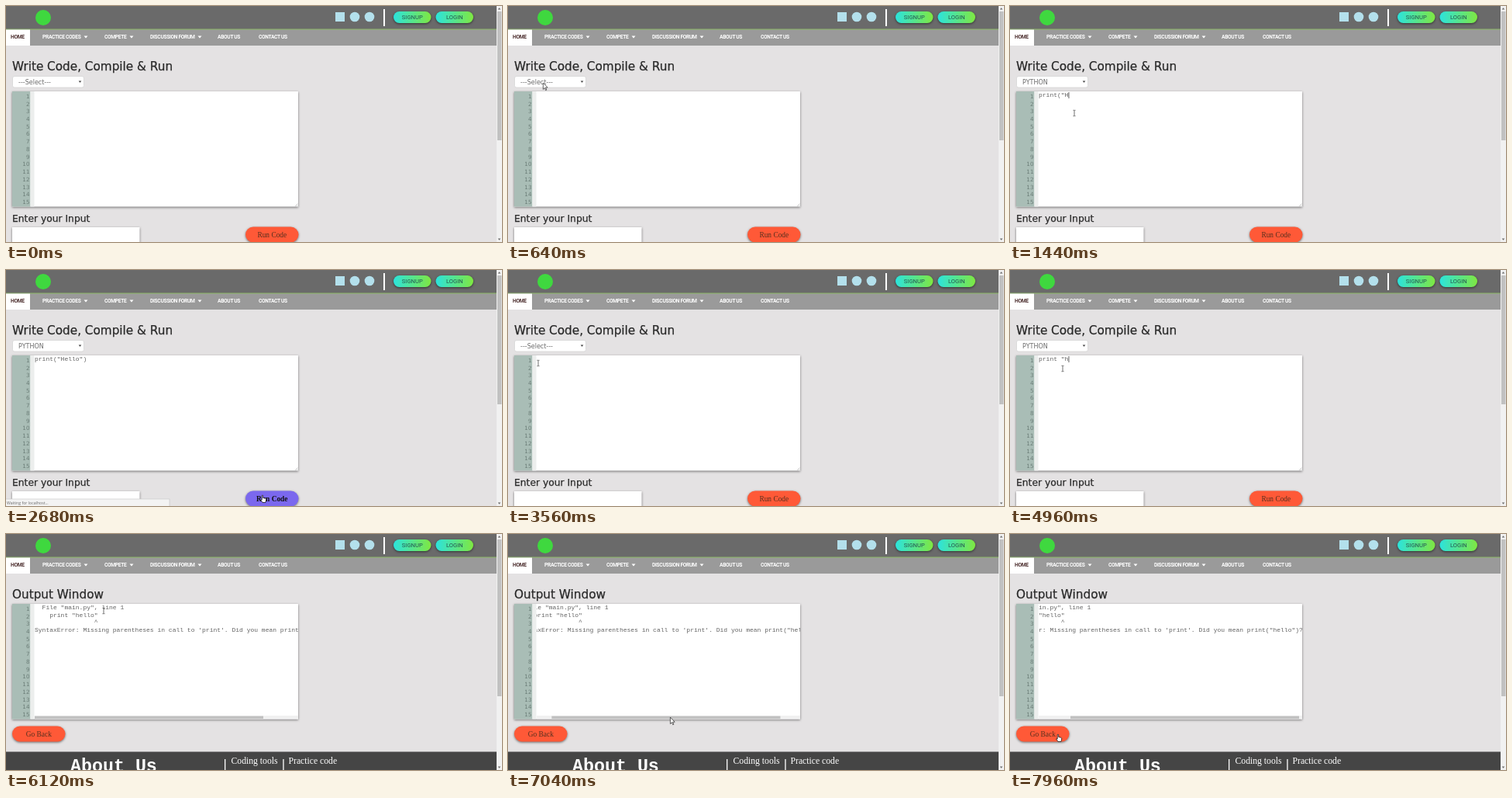
Write an HTML page that moves like this. It is 640 by 304 pixels and loops after 8000 ms.

```html
<!DOCTYPE html>
<html lang="en">
<head>
<meta charset="utf-8">
<title>Online compiler</title>
<style>
html, body { margin: 0; width: 100%; height: 100%; overflow: hidden; background: #e4e2e3; }
svg { display: block; }
text { white-space: pre; }
.head, .sub { fill: #2a2a2a; stroke: #2a2a2a; stroke-width: .25px; }
.head { font: 15.25px "DejaVu Sans", sans-serif; }
.sub { font: 12.3px "DejaVu Sans", sans-serif; }
.field { font: 8px "DejaVu Sans", sans-serif; fill: #6c6c6c; }
.num { font: 7.2px "DejaVu Sans", sans-serif; fill: #6b7d77; text-anchor: end; }
.nav { font: 700 6.7px Roboto, sans-serif; letter-spacing: -.35px; fill: #fff; }
.pill { font: 7.6px Roboto, sans-serif; fill: #235250; text-anchor: middle; }
.btn { font: 9.4px "Liberation Serif", serif; fill: #56301f; text-anchor: middle; }
.hover { fill: #7b68ee; }
.hover + .btn { fill: #111; font-weight: 700; }
.code { font: 8px "Liberation Mono", monospace; fill: #626262; }
.about { font: 700 23.3px "Liberation Mono", monospace; fill: #fff; }
.link { font: 11.7px "Liberation Serif", serif; fill: #fff; }
.status { font: 5.2px "Open Sans", sans-serif; fill: #666; }
.shadow { filter: drop-shadow(0 1px 1.4px #0008); }
</style>
</head>
<body>
<svg id="stage" width="640" height="304" viewBox="0 0 640 304"></svg>
<script>
const LOOP = 8000, CHAR_MS = 55, LINE = 9.73;
const stage = document.getElementById('stage');

const rect = (x, y, w, h, fill, more = '') =>
  `<rect x="${x}" y="${y}" width="${w}" height="${h}" fill="${fill}" ${more}/>`;
const text = (cls, x, y, s, more = '') =>
  `<text class="${cls}" x="${x}" y="${y}" ${more}>${s.replace(/&/g, '&amp;').replace(/</g, '&lt;')}</text>`;
const down = (x, y, r, fill) =>
  `<path d="M${x - r} ${y}h${2 * r}l${-r} ${r * 1.2}z" fill="${fill}"/>`;

const pill = (x, label) =>
  rect(x, 7, 48.5, 15, 'url(#mint)', 'rx="7.5" class="shadow"') + text('pill', x + 24.3, 17.2, label);

const button = (id, x, y, label) =>
  rect(x, y, 68.5, 20, '#ff5937', `id="${id}" rx="10" class="shadow"`) +
  text('btn', x + 34.3, y + 13.2, label);

const menu = [[47, 'PRACTICE CODES', 103], [127, 'COMPETE', 162], [186, 'DISCUSSION FORUM', 250],
  [273, 'ABOUT US'], [326, 'CONTACT US']];

function editor(y) {
  let s = rect(8, y, 369, 148.5, '#fff', 'class="shadow"') +
    rect(8, y, 23.5, 148.5, '#a9bdb6') + rect(31.5, y, 5, 148.5, '#eceeed');
  for (let i = 0; i < 15; i++) s += text('num', 30.5, y + 8.8 + i * LINE, String(i + 1));
  return s;
}

stage.innerHTML = `
<defs>
  <linearGradient id="mint"><stop stop-color="#2ce3dc"/><stop offset="1" stop-color="#7fe741"/></linearGradient>
  <clipPath id="view">${rect(37, 90, 340, 144, '#000')}</clipPath>
</defs>
${rect(0, 0, 640, 304, '#e4e2e3')}
${rect(0, 0, 633, 30, '#6a6a6a')}
${rect(0, 30, 633, 21, '#9a9a9a')}
${rect(0, 29.5, 633, 1, '#8db968')}
<circle cx="48" cy="15" r="10" fill="#3fd83f"/>
${rect(425, 8, 12, 12, '#b3e0ec')}
<circle cx="450" cy="14" r="6.3" fill="#b3e0ec"/>
<circle cx="469" cy="14" r="6.3" fill="#b3e0ec"/>
${rect(487, 4, 2, 22, '#fff')}
${pill(500, 'SIGNUP')}${pill(554.5, 'LOGIN')}
${rect(0, 30.5, 31, 20.5, '#fff')}
${text('nav', 6, 42.3, 'HOME', 'style="fill:#4d2f2f"')}
${menu.map(([x, s, arrow]) => text('nav', x, 42.3, s) + (arrow ? down(arrow, 38.6, 2.5, '#fff') : '')).join('')}

<g id="write">
  ${text('head', 8, 83, 'Write Code, Compile & Run')}
  ${rect(8.5, 90.5, 92, 14.5, '#fff', 'rx="2.5" stroke="#d2d2d2" stroke-width=".7"')}
  <text id="lang" class="field" x="16" y="101"></text>
  ${down(95.5, 96.5, 1.8, '#333')}
  ${editor(110)}
  <path d="M373 258l3.5-3.5M375 258l1.5-1.5" stroke="#999" stroke-width=".5"/>
  <text id="typed" class="code" x="37" y="117"></text>
  ${rect(0, 111, 0.7, 8, '#222', 'id="caret"')}
  ${text('sub', 8, 277.5, 'Enter your Input')}
  ${rect(8, 285, 164.5, 24, '#fff', 'class="shadow"')}
  ${button('run', 309, 284.5, 'Run Code')}
</g>

<g id="output">
  ${text('head', 8, 83, 'Output Window')}
  ${editor(90)}
  <g clip-path="url(#view)"><g id="lines"></g></g>
  <g id="bar">${rect(37, 234, 340, 4.5, '#f1f1f1')}${rect(37, 234.5, 295, 3.5, '#c1c1c1', 'id="thumb"')}</g>
  ${button('back', 8, 247.5, 'Go Back')}
  ${rect(0, 280.5, 633, 24, '#454545')}
  ${text('about', 83, 306, 'About Us')}
  ${rect(282, 290, 1.3, 14, '#fff')}${rect(357.3, 290, 1.3, 14, '#fff')}
  ${text('link', 290.5, 295.5, 'Coding tools')}${text('link', 364.5, 295.5, 'Practice code')}
</g>

<g id="status">
  ${rect(-1, 295, 212, 10, '#f3f3f3', 'stroke="#c4c4c4" stroke-width=".6"')}
  ${text('status', 1, 301.6, 'Waiting for localhost...')}
</g>
${rect(633, 0, 7, 304, '#f1f1f1')}
${rect(634, 7, 5.5, 166, '#c1c1c1', 'id="page"')}
<path d="M634.7 4.5h3.6l-1.8-2.2zM634.7 299.5h3.6l-1.8 2.2z" fill="#666"/>
<g id="pointer">
  <path id="arrow" d="M0 0v8.5l2-1.8 1.3 3 1.2-.5-1.3-3h2.6z" fill="#fff" stroke="#000" stroke-width=".6"/>
  <path id="beam" d="M-1.5-3.7h1.1l.4.4.4-.4h1.1M0-3.3v6.6M-1.5 3.7h1.1l.4-.4.4.4h1.1" fill="none" stroke="#333" stroke-width=".7"/>
  <path id="hand" d="M-1.8-4.5q.8-.8 1.5 0v3l3.2.8q1 .4.8 1.6l-.8 3.6h-3.9l-2.4-3.6q.2-1 1.6.2z" fill="#fff" stroke="#000" stroke-width=".7"/>
</g>`;

const $ = id => document.getElementById(id);
const show = (id, on) => $(id).setAttribute('display', on ? 'inline' : 'none');
const clamp = v => Math.min(1, Math.max(0, v));
const ease = v => (v = clamp(v)) * v * (3 - 2 * v);

const hello = ['Hello'];
const error = ['  File "main.py", line 1', '    print "hello"', ' '.repeat(16) + '^',
  'SyntaxError: Missing parentheses in call to \'print\'. Did you mean print("hello")?'];

// time, x, y of the pointer
const path = [[120, 250, 300], [480, 70, 98], [700, 40, 99], [1000, 83, 138], [1850, 83, 138],
  [2350, 332, 295], [2800, 332, 295], [3240, 60, 258], [3380, 50, 200], [3560, 39, 120],
  [3800, 39, 120], [4050, 60, 98], [4200, 45, 99], [4450, 68, 127], [5250, 68, 127],
  [5600, 332, 295], [5860, 332, 295], [6120, 126, 99], [6300, 126, 99], [6640, 190, 236],
  [6800, 190, 236], [7300, 231, 236], [7500, 231, 236], [7920, 63, 263], [8000, 63, 263]];

function pointerAt(t) {
  const i = Math.max(1, path.findIndex(p => p[0] > t));
  const [a, b] = [path[i - 1], path[i]];
  const k = ease((t - a[0]) / (b[0] - a[0]));
  return [a[1] + (b[1] - a[1]) * k, a[2] + (b[2] - a[2]) * k];
}

let shown;
function setLines(lines) {
  if (shown === lines) return;
  shown = lines;
  $('lines').innerHTML = lines.map((s, i) => text('code', 37, 97 + i * LINE, s)).join('');
}

function draw(t) {
  const second = t >= 3360;
  const out = t >= 5840 || (t >= 2760 && !second);
  show('write', !out);
  show('output', out);
  show('status', (t >= 2520 && t < 2760) || (t >= 5680 && t < 5840));
  $('page').setAttribute('height', out ? 202 : 166);

  const start = second ? 4500 : 980;
  const source = second ? 'print "hello"' : 'print("Hello")';
  const typed = source.slice(0, Math.max(0, Math.floor((t - start) / CHAR_MS)));
  $('typed').textContent = typed;
  $('lang').textContent = t >= (second ? 4200 : 720) ? 'PYTHON' : '---Select---';
  show('caret', t >= start && t < start + 900);
  $('caret').setAttribute('x', 37.2 + typed.length * 4.8);

  setLines(second ? error : hello);
  const scroll = ease((t - 6800) / 500);
  $('lines').setAttribute('transform', `translate(${-48 * scroll})`);
  $('thumb').setAttribute('x', 37 + 41 * scroll);
  show('bar', second);

  const [x, y] = pointerAt(t);
  const onRun = !out && t >= 120 && x > 309 && x < 377 && y > 284;
  const onBack = out && x > 8 && x < 77 && y > 247 && y < 268;
  const top = out ? 90 : 110;
  const inText = x > 32 && x < 377 && y > top && y < top + 144;
  const kind = onRun || onBack ? 'hand' : inText ? 'beam' : 'arrow';
  for (const k of ['arrow', 'beam', 'hand']) show(k, k === kind);
  show('pointer', t >= 120);
  $('pointer').setAttribute('transform', `translate(${x} ${y})`);
  $('run').classList.toggle('hover', onRun);
}

const begin = performance.now();
function tick() {
  draw((performance.now() - begin) % LOOP);
  requestAnimationFrame(tick);
}
tick();
</script>
</body>
</html>
```
